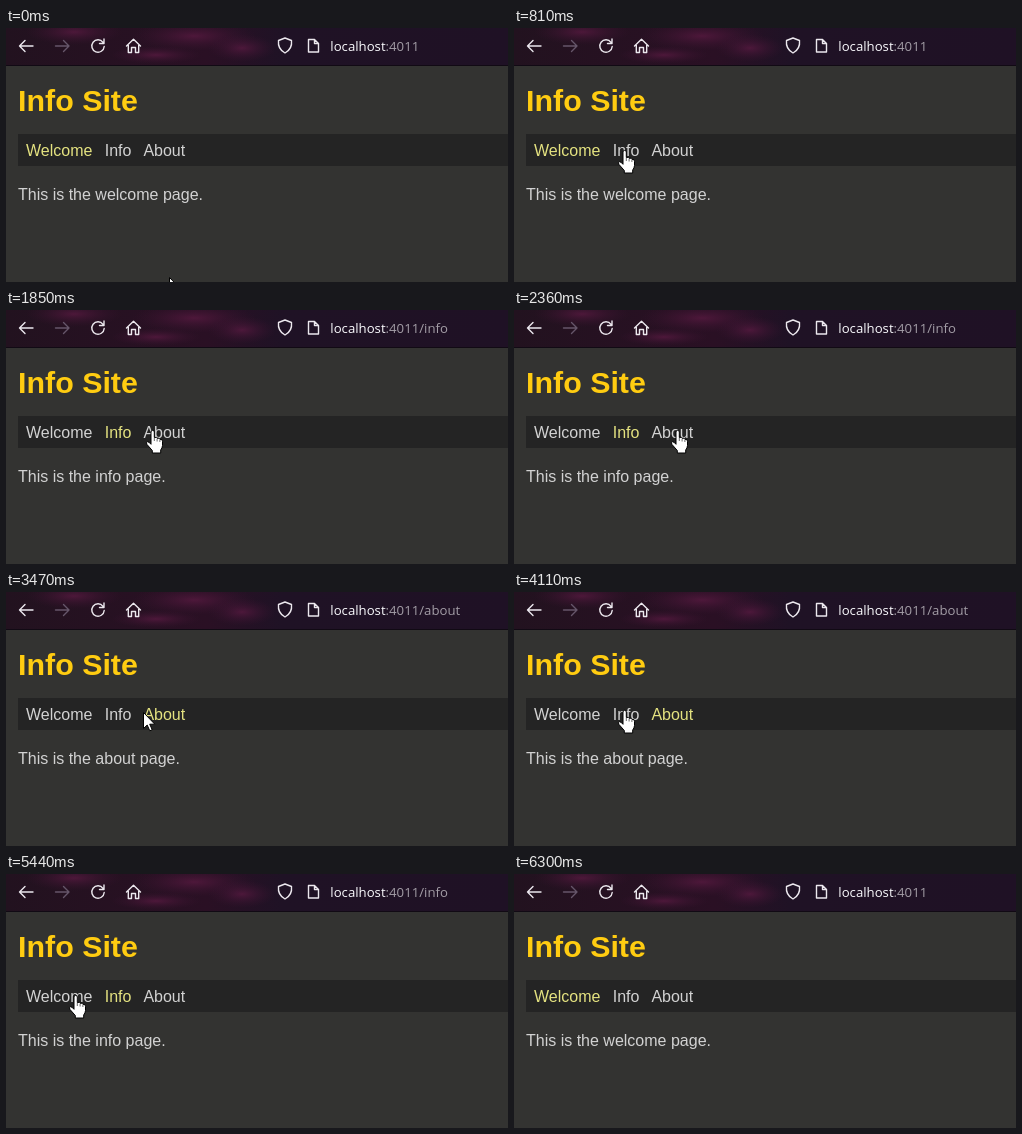
An HTML page for the animation above (7140 ms loop, 502 px wide and 254 px high).

```html
<!DOCTYPE html>
<html lang="en">
<head>
<meta charset="utf-8">
<title>Info Site</title>
<style>
  html, body { margin: 0; width: 100%; height: 100%; overflow: hidden; background: #333331; }
  svg { display: block; }
  text { font: 16px "Liberation Sans", Arial, sans-serif; fill: #d2d2d2; white-space: pre; }
  .title { font-size: 30.4px; font-weight: bold; fill: #fc1; }
  .url { font: 13.2px "Open Sans", "Noto Sans", sans-serif; fill: #a39da6; }
  .host { fill: #fbfbfe; }
  .active { fill: #e4e280; }
  .icons { fill: none; stroke: #ece8ee; stroke-width: 1.4; stroke-linecap: round; stroke-linejoin: round; }
  .off { stroke: #66566a; }
  .cursor { fill: #fff; stroke: #000; stroke-width: 1; stroke-linejoin: round; }
</style>
</head>
<body>
<svg width="502" height="254" viewBox="0 0 502 254">
  <defs>
    <radialGradient id="glow">
      <stop offset="0" stop-color="#5a1a42" stop-opacity=".75"/>
      <stop offset="1" stop-color="#3a1430" stop-opacity="0"/>
    </radialGradient>
    <linearGradient id="sky">
      <stop offset="0" stop-color="#22121f"/>
      <stop offset=".4" stop-color="#2a1024"/>
      <stop offset=".55" stop-color="#1f1225"/>
      <stop offset="1" stop-color="#1f1125"/>
    </linearGradient>
  </defs>

  <rect width="502" height="254" fill="#333331"/>
  <rect width="502" height="38" fill="url(#sky)"/>
  <g fill="url(#glow)">
    <ellipse cx="68" cy="4" rx="48" ry="13"/>
    <ellipse cx="188" cy="8" rx="62" ry="15"/>
    <ellipse cx="236" cy="20" rx="34" ry="14"/>
    <ellipse cx="150" cy="27" rx="45" ry="9"/>
  </g>
  <rect y="37" width="502" height="1" fill="#110a14"/>

  <g class="icons">
    <path d="M27 18H13.5M19 12.5L13.5 18L19 23.5"/>
    <path class="off" d="M49.5 18H63M57.500 12.500L63 18L57.500 23.500"/>
    <path d="M97 14.300A6.200 6.200 0 1 0 98.200 18.500M98 11V15.500H93.500"/>
    <path d="M120.500 18L127.500 11.200L134.500 18M122.300 17V24.500H125.500V19.500H129.500V24.500H132.700V17"/>
    <path d="M279 10L285.500 12.500Q286.500 21 279 25Q271.500 21 272.500 12.500Z"/>
    <path d="M302.500 11.500H308.500L312.500 15.500V24H302.500ZM308.500 11.500V15.500H312.500"/>
  </g>
  <text class="url" x="324.300" y="23"><tspan class="host">localhost</tspan>:4011<tspan id="path"></tspan></text>

  <text class="title" x="12" y="83">Info Site</text>
  <rect x="12" y="106" width="490" height="32" fill="#242424"/>
  <text class="link" x="20" y="128">Welcome</text>
  <text class="link" x="98.700" y="128">Info</text>
  <text class="link" x="137.400" y="128">About</text>
  <text id="body" x="12" y="172"></text>

  <g class="cursor">
    <path id="arrow" d="M.5 .5V16.500L4.200 13L6.800 18.800L9.200 17.700L6.700 12.200H11.800Z"/>
    <g id="hand">
      <path d="M-1 2A1.600 1.600 0 0 1 2.300 2V7.500Q4.800 6.800 5.100 8.300Q7.500 7.600 7.900 9.300Q10.500 8.800 10.500 11.300V15.500Q10.300 18 8.700 20V23H.3V20.500L-5 14.500Q-6.300 12.400-4.600 11.700Q-3.200 11.500-1 14.300Z"/>
      <path d="M2.300 8V11M5.100 8.800V11.500M7.900 9.800V12" stroke-width=".6"/>
    </g>
  </g>
</svg>
<script>
const LOOP = 7140;
const paths = { welcome: "", info: "/info", about: "/about" };
const names = Object.keys(paths);

const visits = [[0, "welcome"], [1370, "info"], [2920, "about"], [4540, "info"], [6030, "welcome"]];

// start time, hotspot x, y, pointer shape
const moves = [
  [0, 163, 249, "arrow"], [150, 133, 208, "arrow"],
  [300, 131, 202, "arrow"], [420, 123, 176, "arrow"], [540, 114, 146, "arrow"],
  [660, 109, 127, "hand"], [810, 110, 122, "hand"],
  [1490, 113, 122, "hand"], [1610, 121, 121, "hand"], [1730, 133, 120, "arrow"],
  [1850, 146, 120, "hand"], [1970, 152, 120, "hand"], [2090, 156, 120, "hand"],
  [2240, 161, 120, "hand"], [2360, 163, 120, "hand"],
  [3200, 158, 120, "hand"], [3320, 149, 120, "hand"], [3470, 137, 120, "arrow"],
  [3590, 127, 119, "arrow"], [3710, 117, 118, "hand"], [3830, 112, 118, "hand"],
  [4110, 110, 118, "hand"],
  [4690, 107, 119, "hand"], [4810, 96, 120, "arrow"], [4930, 83, 121, "hand"],
  [5050, 77, 121, "hand"], [5170, 74, 121, "hand"], [5320, 71, 121, "hand"],
  [5440, 69, 121, "hand"], [6150, 200, 206, "arrow"], [6300, 0, 0, "none"]
];

const get = id => document.getElementById(id);
const links = document.querySelectorAll(".link");
const latest = (list, t) => list.findLast(entry => entry[0] <= t);

function draw(now) {
  const t = now % LOOP;
  const page = latest(visits, t)[1];
  const [, x, y, shape] = latest(moves, t);

  get("path").textContent = paths[page];
  get("body").textContent = `This is the ${page} page.`;
  links.forEach((link, i) => link.classList.toggle("active", names[i] === page));

  for (const id of ["arrow", "hand"]) {
    get(id).setAttribute("transform", `translate(${x} ${y})`);
    get(id).style.display = id === shape ? "" : "none";
  }
}

const start = performance.now();
function tick() {
  draw(performance.now() - start);
  requestAnimationFrame(tick);
}
tick();
</script>
</body>
</html>
```
